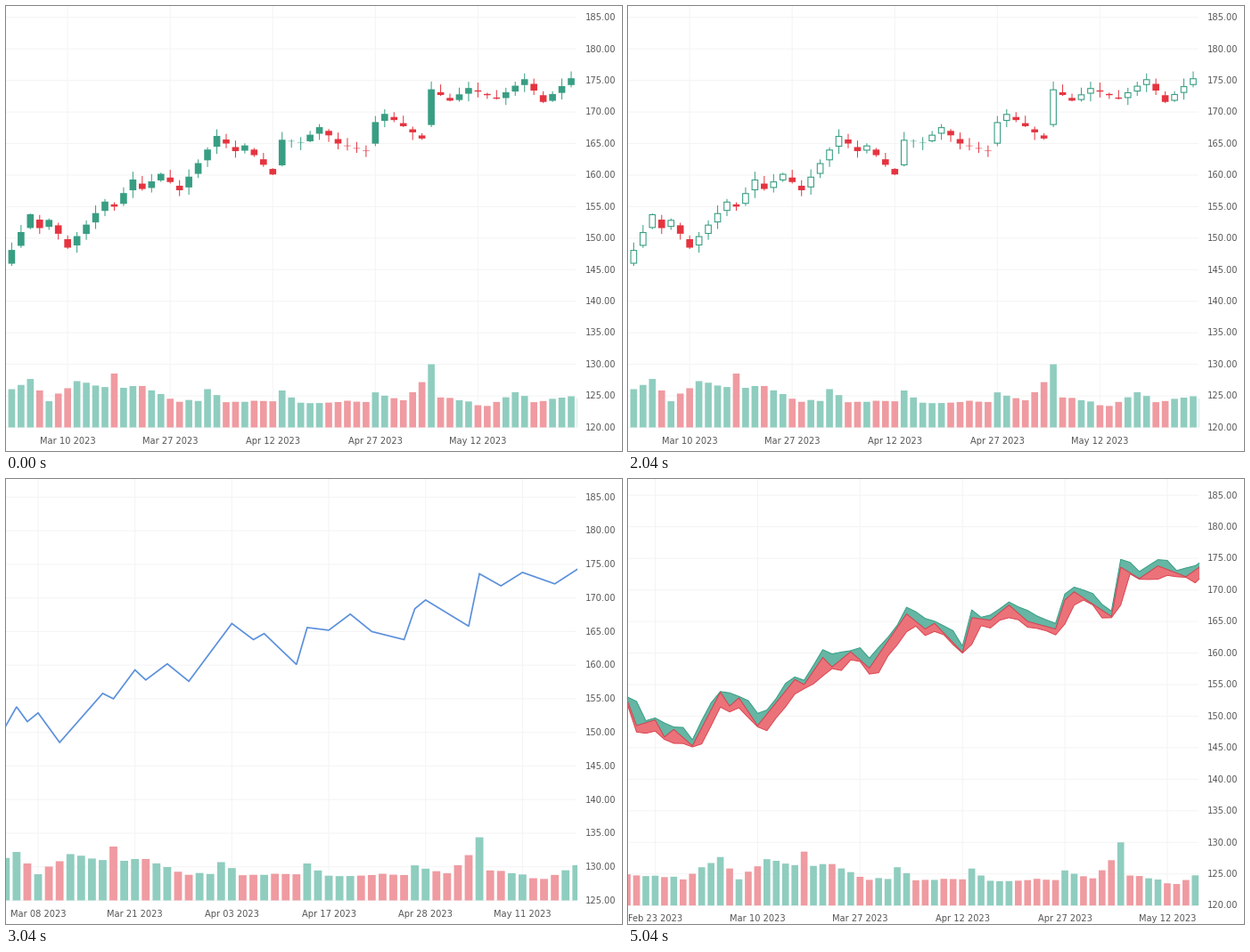
Recreate the animation shown at these times as a matplotlib script. Size 691 px wide and 500 px high, loop 6040 ms.

```python
import numpy as np
import matplotlib.pyplot as plt
from matplotlib.animation import FuncAnimation
from matplotlib.collections import LineCollection, PolyCollection
from matplotlib.patches import Rectangle

W, H, DPI = 691, 500, 100
PX = 72 / DPI
STEP_MS, LOOP_MS = 40, 6040
PLOT_W = 641

UP, DOWN = "#389e83", "#e53440"
VOL_UP, VOL_DOWN = "#8fcdbf", "#ef9ba1"
BAND_UP, BAND_DOWN = "#65b6a4", "#ec727a"
BLUE, GRID, INK = "#5b90dc", "#f4f4f4", "#555555"

# Turning points as (day, value); the days between lie on straight lines.
CLOSE_TURNS = [
    (-9, 153), (-8, 152.5), (-7, 148.5), (-5, 149.4), (-4, 146.7), (-3, 147.9),
    (-1, 145.3), (2, 153.8), (3, 151.6), (4, 152.9), (6, 148.5), (10, 155.8),
    (11, 155), (13, 159.3), (14, 157.8), (16, 160.2), (18, 157.6), (22, 166.2),
    (24, 163.8), (25, 164.7), (28, 160.1), (29, 165.6), (31, 165.2), (33, 167.6),
    (35, 165), (38, 163.8), (39, 168.4), (40, 169.7), (44, 165.8), (45, 173.6),
    (47, 171.8), (49, 173.8), (52, 172.1), (55, 175.2), (57, 171.6), (61, 176.6)]
VOLUME_TURNS = [
    (-8, 57), (-2, 49), (2, 87), (4, 48), (7, 84), (10, 75), (11, 99), (12, 74),
    (14, 75), (18, 47), (20, 50), (21, 69), (23, 47), (28, 49), (29, 68), (31, 43),
    (38, 48), (39, 65), (42, 49), (44, 81), (45, 113), (46, 56), (51, 38),
    (54, 65), (56, 46), (60, 55)]


def make_series():
    """Closes follow the turns; opens gap part of the way from the last close."""
    rng = np.random.default_rng(12)
    all_days = np.arange(-9, 62)
    close = np.interp(all_days, *zip(*CLOSE_TURNS))
    prev, close = close[:-1], close[1:]
    opening = prev + 0.3 * (close - prev) - 0.2
    wick = rng.uniform(0.1, 1.3, (2, len(close)))
    high = np.maximum(opening, close) + wick[0]
    low = np.minimum(opening, close) - wick[1]
    volume = np.interp(all_days[1:], *zip(*VOLUME_TURNS)) + rng.uniform(-2, 2, len(close))
    return all_days[1:], opening, high, low, close, volume


days, opens, highs, lows, closes, volumes = make_series()
rising = closes >= opens
shown = (days >= 0) & (days <= 60)

fig = plt.figure(figsize=(W / DPI, H / DPI), dpi=DPI, facecolor="white")
ax = fig.add_axes([0, 0, 1, 1])
ax.set_xlim(0, W)
ax.set_ylim(H, 0)
ax.axis("off")
ax.add_patch(Rectangle((PLOT_W, 0), W - PLOT_W, H, color="white", lw=0, zorder=8))


def segments(segs, color, z=3):
    return ax.add_collection(LineCollection(
        segs, colors=color, linewidths=PX, capstyle="butt", zorder=z, snap=False))


def boxes(left, top, right, bottom, color, z):
    polys = [[(a, b), (c, b), (c, d), (a, d)]
             for a, b, c, d in zip(left, top, right, bottom)]
    return ax.add_collection(
        PolyCollection(polys, facecolors=color, linewidths=0, zorder=z, snap=False))


def label(x, y, text, ha):
    return ax.text(x, y, text, ha=ha, va="baseline", color=INK, zorder=9,
                   family="DejaVu Sans", size=9.85 * PX)


class View:
    """Maps days and prices to pixels and draws the shared parts."""

    def __init__(self, x0, step, base, floor, scale, dates):
        self.x = x0 + step * days
        self.half = 0.365 * step
        self.base, self.floor, self.scale = base, floor, scale
        prices = range(floor, 186, 5)
        grid = [[(0, self.y(p)), (PLOT_W - 1, self.y(p))] for p in prices]
        grid += [[(x0 + step * d, 0), (x0 + step * d, base)] for d, _ in dates]
        self.parts = [segments(grid, GRID, 1)]
        self.parts += [label(649.5, self.y(p) + 3.3, f"{p}.00", "left") for p in prices]
        self.parts += [label(x0 + step * d, base + 18.2, f"{text} 2023", "center")
                       for d, text in dates]
        colors = np.where(rising, VOL_UP, VOL_DOWN)
        self.parts.append(boxes(self.x - self.half, base - 0.618 * volumes,
                                self.x + self.half, np.full(len(days), base), colors, 2))

    def y(self, price):
        return self.base - (price - self.floor) * self.scale

    def candles(self):
        ys = (self.y(s[shown]) for s in (opens, highs, lows, closes))
        return self.x[shown], *ys, np.where(rising[shown], UP, DOWN)


def draw_candles(v):
    x, o, h, l, c, colors = v.candles()
    top, bottom = np.minimum(o, c), np.maximum(o, c)
    wicks = segments([[(a, b), (a, d)] for a, b, d in zip(x, h, l)], colors)
    bodies = boxes(x - v.half, top, x + v.half, bottom, colors, 4)
    k = rising[shown] & (bottom - top > 2)
    holes = boxes(x[k] - v.half + 1.1, top[k] + 1.1,
                  x[k] + v.half - 1.1, bottom[k] - 1.1, "white", 5)
    return [wicks, bodies], holes


def draw_bars(v):
    segs, colors = [], []
    for x, o, h, l, c, color in zip(*v.candles()):
        segs += [[(x, h), (x, l)], [(x - v.half, o), (x, o)], [(x, c), (x + v.half, c)]]
        colors += [color] * 3
    return segments(segs, colors)


def draw_line(v, style):
    return ax.plot(v.x, v.y(closes), color=BLUE, lw=1.7 * PX, drawstyle=style,
                   solid_joinstyle="miter", zorder=4, snap=False)


def draw_bands(v):
    h, l, c = v.y(highs), v.y(lows), v.y(closes)
    parts = [ax.fill_between(v.x, h, c, color=BAND_UP, lw=0, zorder=3),
             ax.fill_between(v.x, c, l, color=BAND_DOWN, lw=0, zorder=3)]
    for ys, color in ((h, UP), (l, "#dc4550"), (c, "#c7434e")):
        parts += ax.plot(v.x, ys, color=color, lw=PX, zorder=4)
    return parts


SPRING = [(6, "Mar 10"), (17, "Mar 27"), (28, "Apr 12"), (39, "Apr 27"), (50, "May 12")]
wide = View(6.4, 10.46, 473.5, 120, 7.088, SPRING)
near = View(-12.3, 12.075, 473.5, 125, 7.552,
            [(4, "Mar 08"), (13, "Mar 21"), (22, "Apr 03"),
             (31, "Apr 17"), (40, "Apr 28"), (49, "May 11")])
early = View(82.7, 10.445, 479.2, 120, 7.092, [(-5, "Feb 23")] + SPRING)

solid, holes = draw_candles(wide)
scenes = [
    wide.parts + solid,
    wide.parts + [draw_bars(wide)],
    wide.parts + solid + [holes],
    near.parts + draw_line(near, "default"),
    near.parts + draw_line(near, "steps-post"),
    early.parts + draw_bands(early),
]
everything = [a for s in scenes for a in s]


def update(k):
    scene = max(0, (k * STEP_MS - 40) // 1000)
    for a in everything:
        a.set_visible(False)
    for a in scenes[scene]:
        a.set_visible(True)
    return scenes[scene]


anim = FuncAnimation(fig, update, frames=LOOP_MS // STEP_MS, interval=STEP_MS,
                     init_func=lambda: update(0), repeat=True, repeat_delay=0)
plt.show()
```
